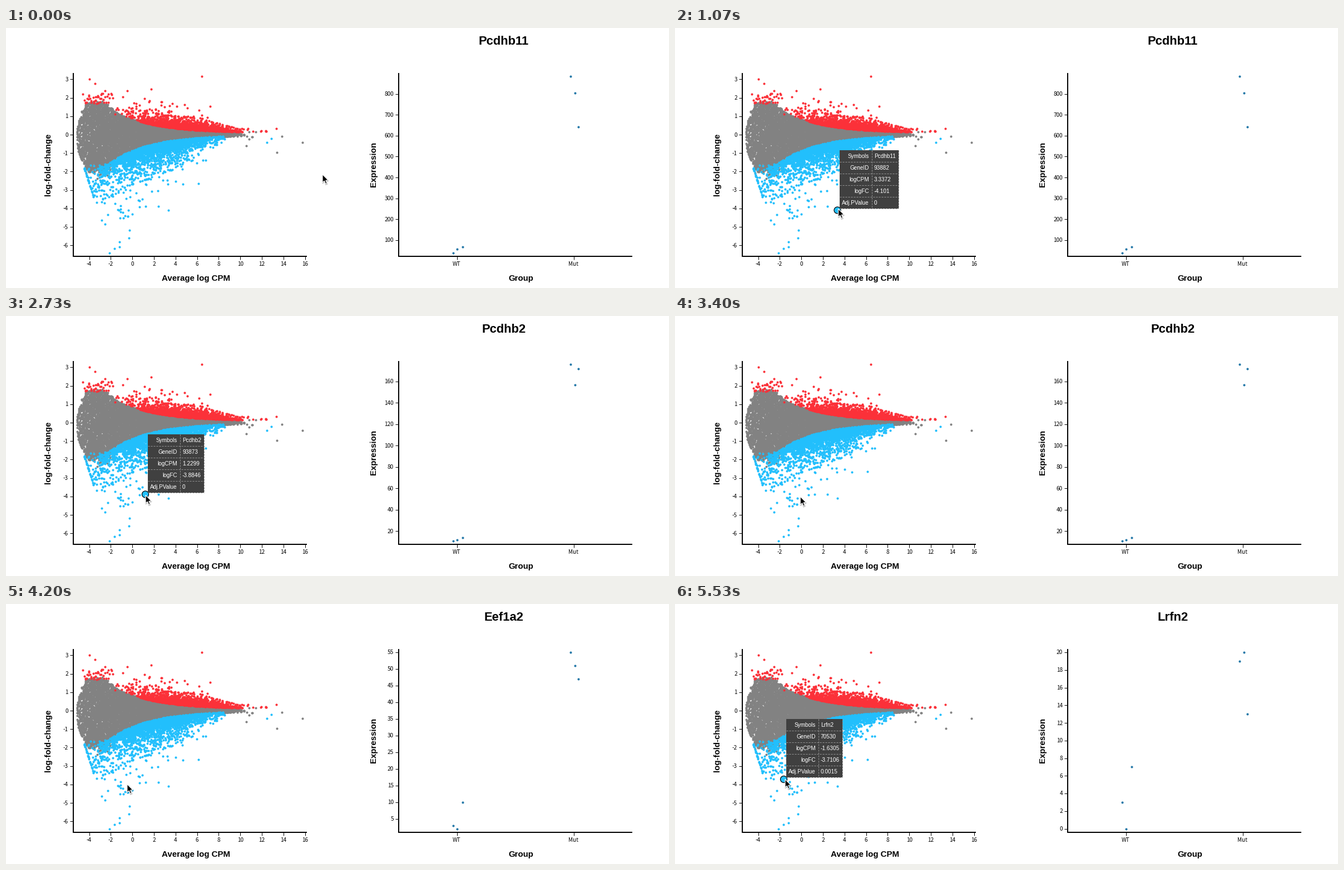
Recreate the animation shown at these times as a matplotlib script. Size 1192 by 468 pixels, loop 5.67 s.

```python
import numpy as np
import matplotlib.pyplot as plt
from matplotlib.animation import FuncAnimation
from matplotlib.patches import Circle, Polygon, Rectangle

W, H, DPI = 1192, 468, 100
PT = 72 / DPI  # points per pixel
FRAMES, INTERVAL = 135, 42
RED, BLUE, GREY, TEAL = "#fb3139", "#22bffc", "#828282", "#2578a8"
SANS, TICK = "Liberation Sans", "Noto Sans CJK JP"

rng = np.random.default_rng(11)
fig = plt.figure(figsize=(W / DPI, H / DPI), dpi=DPI, facecolor="white")
ax = fig.add_axes([0, 0, 1, 1])
ax.set_xlim(0, W)
ax.set_ylim(H, 0)
ax.axis("off")


# ---- drawing helpers, all in pixels ----
def line(xs, ys, width=1, color="black", z=2, **kw):
    return ax.plot(xs, ys, color=color, lw=width * PT, zorder=z,
                   solid_capstyle="butt", **kw)[0]


def label(x, y, text, size, font=SANS, ha="center", z=3, **kw):
    return ax.text(x, y, text, fontsize=size * PT, family=font, ha=ha,
                   va=kw.pop("va", "baseline"), zorder=z, **kw)


def dots(x, y, color, z=1):
    return ax.plot(x, y, "o", ms=4.1 * PT, color=color, mew=0, zorder=z)[0]


def x_tick(x, text):
    line([x, x], [411, 417])
    label(x, 428, text, 10, TICK)


def y_tick(axis_x, y, text):
    return [line([axis_x - 6, axis_x], [y, y]),
            label(axis_x - 9, y + 3.5, text, 10, TICK, ha="right")]


def frame_axes(x, x_title, y_title):
    line([x, x], [81, 412], 2)
    line([x - 1, x + 420], [411, 411], 2)
    label(x + 220, 455, x_title, 15, weight="bold")
    label(x - 45, 246, y_title, 15, weight="bold", rotation=90, va="center")


# ---- left chart: funnel-shaped cloud ----
def nose(x):
    """Half height of the rounded left end of the funnel."""
    return 57 * np.sqrt(np.clip(1 - (np.clip(152 - x, 0, 25) / 25) ** 2, 0, 1))


def top(x):
    return np.maximum(188.5 - 41.5 * np.exp((190 - x) / 70), 194 - nose(x))


def bottom(x):
    return np.minimum(193 + 59 * np.exp((175 - x) / 72), 194 + nose(x))


def above_slant(x, y):
    return y < 252 + 3 * (x - 140)


def scatter_box(n, x0, x1, y0, y1):
    return rng.uniform(x0, x1, n), rng.uniform(y0, y1, n)


def grey_cloud():
    x = 128 + 300 * (1 - np.sqrt(1 - rng.random(7500)))
    x = x[rng.random(x.size) < (x - 116) / 45]
    y = top(x) + rng.random(x.size) * (bottom(x) - top(x))
    fx = rng.uniform(143, 192, 200)
    over = rng.exponential(5, fx.size).clip(0, 20)
    fy = np.where(rng.random(fx.size) < 0.3, top(fx) - over / 3, bottom(fx) + over)
    return np.c_[(x, y), (fx, fy), scatter_box(25, 395, 428, 188, 195),
                 scatter_box(8, 428, 450, 187, 202)]


def red_cloud():
    x = np.r_[rng.triangular(222, 335, 430, 1500), rng.triangular(190, 290, 400, 240)]
    spread = np.where(np.arange(x.size) < 1500, 5.5, 11) * np.clip((440 - x) / 90, 0.3, 1)
    y = top(x) - rng.exponential(1, x.size).clip(0, 4) * spread
    return np.c_[(x, y), scatter_box(40, 137, 192, 117, 136),
                 scatter_box(14, 190, 235, 140, 160),
                 scatter_box(9, 426, 470, 181, 187)]


def blue_cloud():
    x = np.r_[rng.triangular(160, 265, 397, 2000), rng.triangular(155, 225, 395, 420)]
    spread = np.where(np.arange(x.size) < 2000, 1, 1.9) * (2 + (397 - x) / 10).clip(2, 14)
    y = bottom(x) - 1 + rng.exponential(1, x.size).clip(0, 4.3) * spread
    t = rng.random(36)  # low counts line up along the slanted edge
    x, y = np.c_[(x, y), (140.5 + 21 * t, 251 + 66 * t),
                 scatter_box(70, 148, 182, 245, 315),
                 scatter_box(6, 176, 222, 318, 342)]
    keep = above_slant(x, y)
    return x[keep], y[keep]


FAR = {
    GREY: [(533, 206), (487, 223.5), (496, 195), (432, 212)],
    RED: [(352, 87), (150, 91.5), (160, 100), (178, 113), (218, 113), (260.5, 110),
          (258, 131), (307, 141), (367, 141), (486, 181)],
    BLUE: [(186, 404.5), (195, 396.5), (204, 385), (204, 394), (221, 378),
           (222, 364), (178, 353), (345.5, 279.5), (477, 199), (469, 206)],
}
for cloud, color in ((grey_cloud, GREY), (red_cloud, RED), (blue_cloud, BLUE)):
    dots(*np.c_[cloud(), np.transpose(FAR[color])], color)

frame_axes(121, "Average log CPM", "log-fold-change")
for v in range(-4, 17, 2):
    x_tick(227.2 + 19.4 * v, str(v))
for v in range(-6, 4):
    y_tick(121, 192 - 33.2 * v, str(v))

# ---- right chart: expression per group ----
frame_axes(706, "Group", "Expression")
x_tick(810.5, "WT")
x_tick(1020.5, "Mut")
SAMPLE_X = [803.5, 810.5, 821, 1015, 1023, 1028.5]


def expression(symbol, values, step):
    low, high = min(values), max(values)

    def to_y(v):
        return 404.5 - 317.5 * (v - low) / (high - low)

    parts = [label(895, 30, symbol, 22, weight="bold"),
             dots(SAMPLE_X, [to_y(v) for v in values], TEAL)]
    for v in range(-(-low // step) * step, high + 1, step):
        parts += y_tick(706, to_y(v), str(v))
    return parts


def tooltip(x, y, values):
    left, base = round(x + 4.2), round(y - 3.4)
    head = base - 105
    rows = [head + 21 * i for i in range(5)]
    names = ("Symbols", "GeneID", "logCPM", "logFC", "Adj.PValue")
    white = dict(color="white", z=7)
    dash = dict(color="#949494", z=6, linestyle=(0, (3, 2)))

    cells = [label(left + 62, r + 14, v, 10, ha="left", **white)
             for r, v in zip(rows, values)]
    width = 67 + round(max(c.get_window_extent().width for c in cells))
    right = left + width
    parts = [ax.add_patch(Circle((x, y), 6, fc=BLUE, ec="black", lw=1.2 * PT, zorder=4)),
             ax.add_patch(Rectangle((left, head), width, 105, fc="#404040", lw=0, zorder=5))]
    for r, name in zip(rows, names):
        parts += [label(left + 53, r + 14, name, 10, ha="right", **white),
                  line([left, right], [r + 20.5] * 2, **dash)]
    parts += [line([vx, vx], [head, base], **dash) for vx in (left + 57.5, right - 0.5)]
    return parts + cells


# symbol, samples, tick step, point, details
GENES = [
    ("Pcdhb11", (40, 56, 68, 884, 804, 643), 100, (292, 328),
     ("93882", "3.3372", "-4.101", "0")),
    ("Pcdhb2", (11, 12, 14, 176, 157, 172), 20, (250.5, 321),
     ("93873", "1.2299", "-3.8846", "0")),
    ("Eef1a2", (3, 2, 10, 55, 51, 47), 5, (219.5, 328),
     ("13628", "-0.3871", "-4.0929", "0")),
    ("Lrfn2", (3, 0, 7, 19, 20, 13), 2, (195.5, 315.5),
     ("70530", "-1.6305", "-3.7106", "0.0015")),
]
charts, tips = [], []
for symbol, values, step, point, details in GENES:
    charts.append(expression(symbol, values, step))
    tips.append(tooltip(*point, (symbol,) + details))
    dots(*point, BLUE)

# ---- pointer ----
ARROW = np.array([(0, 0), (0, 14.8), (3.4, 11.7), (5.7, 17.1), (8.2, 16),
                  (5.9, 10.8), (10.4, 10.5)])
shadow = ax.add_patch(Polygon(ARROW, fc="black", ec="black", lw=2 * PT,
                              alpha=0.2, zorder=8))
arrow = ax.add_patch(Polygon(ARROW, fc="black", ec="white", lw=1.2 * PT, zorder=9))

# one leg per gene: departure tick, arrival tick, resting place
START = np.array((568.5, 263))
LEGS = [(0, 11, (293, 325)), (24, 33, (250.5, 322)),
        (41, 53, (220, 325)), (59, 73, (197.5, 315))]
LINGER = 2  # ticks a tooltip stays after the pointer departs


def pointer(tick):
    pos = START
    for leave, arrive, rest in LEGS:
        u = np.clip((tick - leave) / (arrive - leave), 0, 1)
        pos = pos + (np.array(rest) - pos) * u * u * (3 - 2 * u)
    return pos


def show(parts, on):
    for p in parts:
        p.set_visible(on)


def update(i):
    tick = i * 17 // 27  # the screen refreshes 15 times per second
    arrived = [n for n, leg in enumerate(LEGS) if tick >= leg[1]]
    current = arrived[-1] if arrived else 0
    is_last = current == len(LEGS) - 1
    hovering = arrived and (is_last or tick < LEGS[current + 1][0] + LINGER)
    for n in range(len(GENES)):
        show(charts[n], n == current)
        show(tips[n], bool(hovering) and n == current)
    pos = pointer(tick)
    arrow.set_xy(ARROW + pos + 0.5)
    shadow.set_xy(ARROW + pos + (0.8, 1.8))
    return []


anim = FuncAnimation(fig, update, frames=FRAMES, interval=INTERVAL,
                     init_func=lambda: update(0), repeat=True, repeat_delay=0)
plt.show()
```
